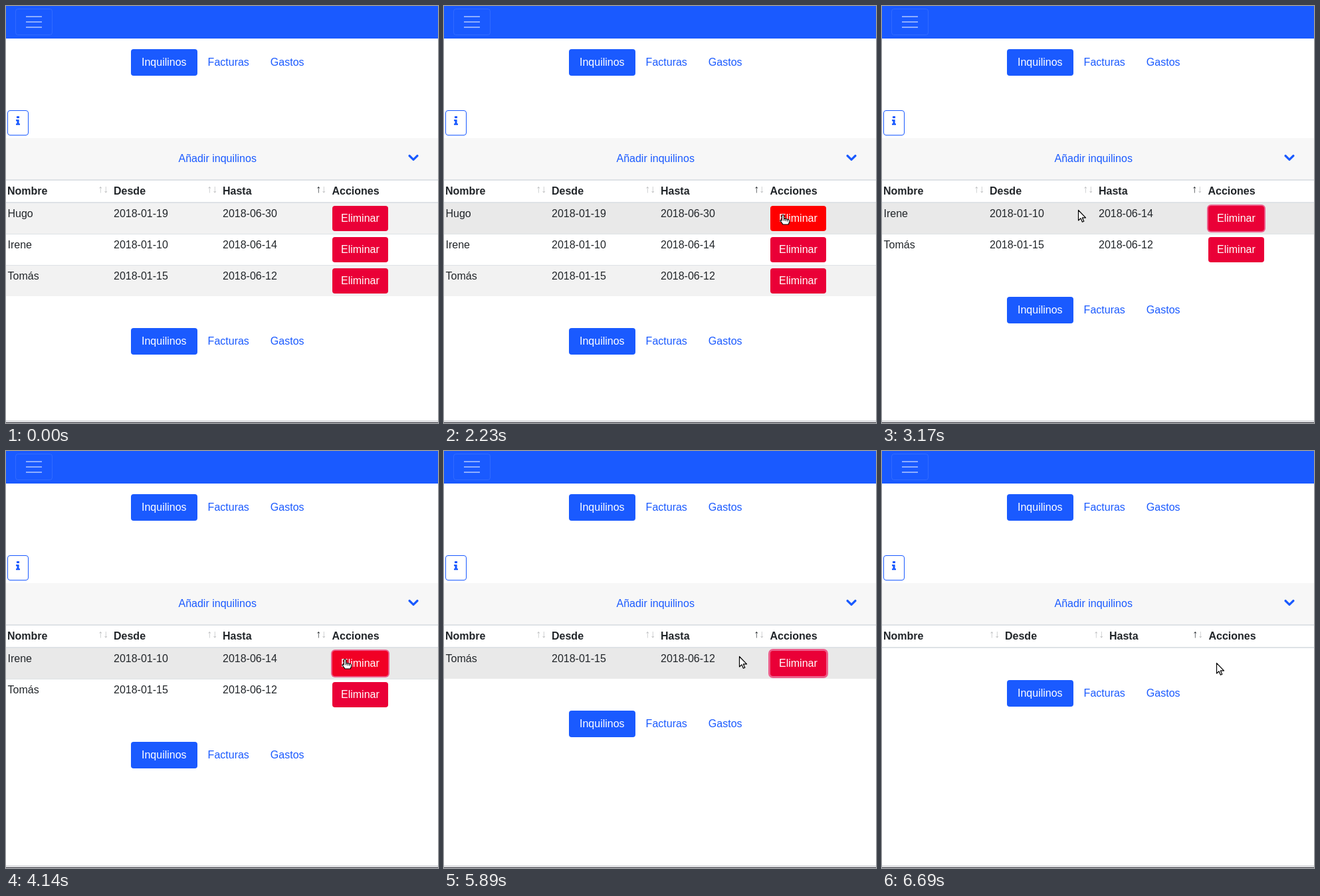
Write an HTML page that moves like this. It is 650 px wide and 628 px high and loops after 7.12 s.

```html
<!DOCTYPE html>
<html lang="es">
<head>
<meta charset="utf-8">
<title>Inquilinos</title>
<style>
html, body { margin: 0; width: 100%; height: 100%; overflow: hidden; background: #fff; }
body { --blue: #1a5aff; position: relative; font: 16px/24px "Liberation Sans", Arial, sans-serif; color: #212529; }
body *, svg { position: absolute; box-sizing: border-box; white-space: nowrap; }
.nav { left: 0; top: 0; width: 100%; height: 49px; background: var(--blue); }
.menu { left: 14px; top: 4px; width: 56px; height: 40px; border: 1px solid rgba(255,255,255,.1); border-radius: 4px; }
.menu i { left: 15px; width: 24px; height: 2px; background: rgba(255,255,255,.5); }
.tabs { left: 188px; display: flex; color: var(--blue); }
.tabs span { position: static; padding: 8px 16px; border-radius: 4px; }
.tabs span:first-child { background: var(--blue); color: #fff; }
.info { left: 2px; top: 157px; width: 32px; height: 38px; border: 1px solid var(--blue); border-radius: 4px; }
.card { left: 0; top: 199px; width: 100%; height: 62px; background: #f7f7f7; color: var(--blue); }
.card span { left: 259.5px; top: 19px; }
.head { left: 0; top: 261px; width: 100%; height: 36px; border: solid #dee2e6; border-width: 2px 0; font-weight: bold; }
.head span { top: 4px; }
.head .sort { top: 1px; opacity: .3; }
.head .on { opacity: 1; }
.row { left: 0; width: 100%; height: 47px; border-top: 1px solid #dee2e6; }
.row span { top: 4px; }
.row b { left: 491px; top: 4px; height: 38px; padding: 7px 13px; border-radius: 4px; font-weight: normal; color: #fff; }
.foot { left: 0; top: 624px; width: 100%; height: 4px; background: #dcdde0; border-bottom: 1px solid #3d3d45; }
svg { left: 0; top: 0; overflow: visible; }
</style>
</head>
<body>
<div class="nav"><div class="menu"><i style="top:10px"></i><i style="top:18px"></i><i style="top:26px"></i></div></div>
<div class="tabs" style="top:65px"><span>Inquilinos</span><span>Facturas</span><span>Gastos</span></div>
<div class="info"></div>
<div class="card"><span>Añadir inquilinos</span></div>
<div class="head" id="head"></div>
<div id="rows" style="left:0;top:0;width:100%"></div>
<div class="tabs" id="lower"><span>Inquilinos</span><span>Facturas</span><span>Gastos</span></div>
<div class="foot"></div>
<svg width="650" height="628">
  <path d="M16 166h4v3h-4zM15 171h4.6v6h1.4v2.2h-6v-2.2h1.4v-3.8H15z" fill="#1a5aff"/>
  <path d="M607 225.5l6 5.8l6-5.8" fill="none" stroke="#1a5aff" stroke-width="3.2" stroke-linejoin="round" stroke-linecap="round"/>
  <g id="cursor" fill="#fff" stroke="#000" stroke-width="1.2" stroke-linejoin="round">
    <path id="arrow" d="M.5 .5V16L4 12.8L6.4 18.3L8.8 17.3L6.4 11.9H11.5Z"/>
    <g id="hand">
      <path d="M-1.5 1.5Q0 -.5 1.5 1.5V6L8 7.5Q9.5 8 9.5 10V12L8 15H0L-4 9.5Q-4 7.5 -1.5 9Z"/>
      <path d="M1.5 6v3.5M4 7v3M6.5 7.5v3" stroke-width="1"/>
    </g>
  </g>
</svg>
<script>
const LOOP = 7120, ROW = 47, TOP = 296;
const $ = id => document.getElementById(id);
const add = (parent, tag, text, left, cls = '') => {
  const el = parent.appendChild(document.createElement(tag));
  el.textContent = text;
  el.className = cls;
  if (left !== undefined) el.style.left = left + 'px';
  return el;
};

const heads = ['Nombre', 'Desde', 'Hasta', 'Acciones'];
const cols = [2, 162, 326, 490.5], emptyCols = [2, 185, 342, 491.5];
const labels = heads.map((name, i) => add($('head'), 'span', name, cols[i]));
const sorts = [1, 2, 3].map(i => ['↑', '↓'].map((a, k) =>
  add($('head'), 'span', a, 0, i === 3 && !k ? 'sort on' : 'sort')));

const rows = [
  ['Hugo', '2018-01-19', '2018-06-30'],
  ['Irene', '2018-01-10', '2018-06-14'],
  ['Tomás', '2018-01-15', '2018-06-12']
].map(data => {
  const el = add($('rows'), 'div', '', 0, 'row');
  data.forEach((text, i) => add(el, 'span', text, i ? cols[i] : 2.5));
  return { el, button: add(el, 'b', 'Eliminar') };
});

const removals = [2290, 4590, 6640];
const hot = [[1440, 2970], [4095, 5520], [6270, 6640]];
// start, end, steps, target x, target y, easing power
const moves = [
  [1230, 1450, 6, 510, 314, 1.6],
  [2970, 3330, 9, 251, 306, 2.2],
  [3740, 4100, 9, 510, 313, 1.4],
  [4480, 4530, 2, 516, 312, 1],
  [5520, 5890, 9, 444, 309, 2],
  [6150, 6300, 4, 504, 319, 1.5],
  [6640, 6640, 1, 503, 319, 1]
];

function pointer(t) {
  let x = -30, y = 622;
  for (const [start, end, steps, tx, ty, power] of moves) {
    if (t < start) break;
    const step = steps > 1 ? Math.floor((t - start) / (end - start) * (steps - 1)) + 1 : 1;
    const p = 1 - (1 - Math.min(1, step / steps)) ** power;
    x += (tx - x) * p;
    y += (ty - y) * p;
  }
  return { x, y };
}

function heat(t) {
  let h = 0;
  for (const [on, off] of hot) {
    if (t >= on) h = t < off ? Math.min(1, (t - on) / 140) : Math.max(0, 1 - (t - off) / 140);
  }
  return h;
}

function draw(t) {
  const gone = removals.filter(r => t >= r).length, left = rows.length - gone;
  const { x, y } = pointer(t);
  const over = t >= 1230 ? Math.floor((y - TOP) / ROW) : -1;
  const h = heat(t);

  rows.forEach(({ el, button }, i) => {
    const n = i - gone;
    el.style.display = n < 0 ? 'none' : '';
    el.style.top = TOP + n * ROW + 'px';
    el.style.background = n === over ? '#e9e9e9' : n % 2 ? '#fff' : '#f2f2f2';
    button.style.background = n ? '#ea0037' : `rgb(${234 + 21 * h},0,${55 * (1 - h)})`;
    button.style.boxShadow = n === 0 && gone ? `0 0 0 ${gone + 1}px rgba(240,20,90,.65)` : 'none';
  });
  $('lower').style.top = (left ? TOP + left * ROW + 48 : 345) + 'px';

  const at = left ? cols : emptyCols;
  labels.forEach((el, i) => el.style.left = at[i] + 'px');
  sorts.forEach((pair, i) => pair.forEach((el, k) =>
    el.style.left = at[i + 1] - 24 + 8 * k + (i === 2 ? -.5 : 0) + 'px'));

  const onButton = over >= 0 && over < left && x > 491 && x < 575;
  $('cursor').style.display = t < 1230 ? 'none' : '';
  $('cursor').setAttribute('transform', `translate(${Math.round(x)} ${Math.round(y)})`);
  $('hand').style.display = onButton ? '' : 'none';
  $('arrow').style.display = onButton ? 'none' : '';
}

const begin = performance.now();
function tick() {
  draw((performance.now() - begin) % LOOP);
  requestAnimationFrame(tick);
}
tick();
</script>
</body>
</html>
```
